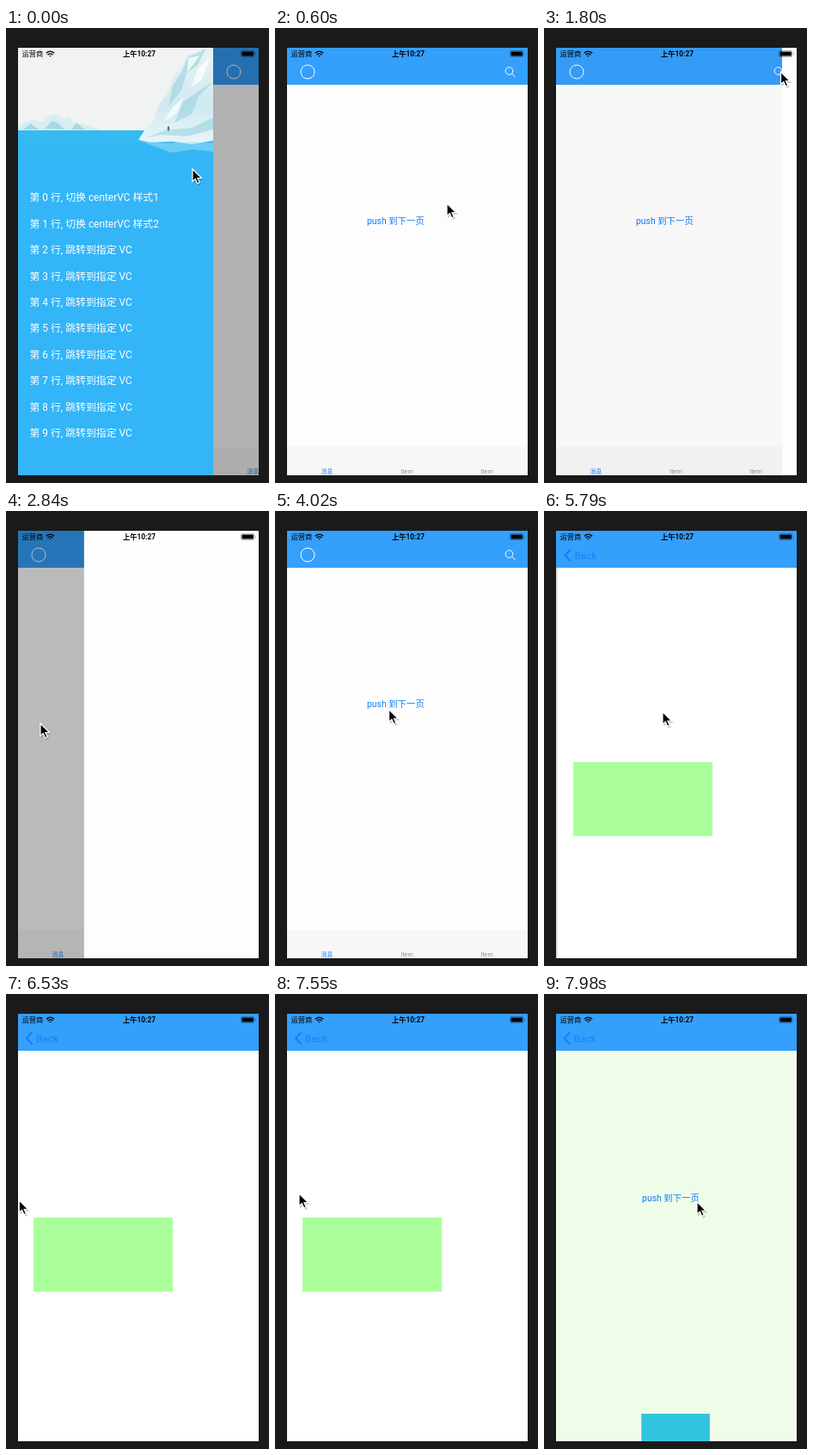
These frames come from a looping animation (306 by 529 pixels, 8000 ms). An HTML page:

```html
<!DOCTYPE html>
<html lang="zh-CN">
<head>
<meta charset="utf-8">
<title>Drawer navigation</title>
<style>
html, body { margin: 0; width: 100%; height: 100%; overflow: hidden; background: #1a1a1a; }
svg { display: block; width: 100vw; height: 100vh; }
text { font-family: Roboto, "Noto Sans CJK SC", "Noto Sans CJK", sans-serif; }
.link { font-size: 10.4px; fill: #0f7cff; }
.row { font-size: 11.9px; fill: #fff; }
.tab { font-size: 7.2px; fill: #929292; text-anchor: middle; }
.status { font-size: 8.3px; font-weight: 500; }
</style>
</head>
<body>
<svg viewBox="0 0 306 529">
  <defs>
    <clipPath id="screen"><rect x="14" y="23" width="280" height="497"/></clipPath>
    <clipPath id="panel"><rect x="14" y="23" width="227" height="497"/></clipPath>
    <linearGradient id="sea" x2="0" y2="1">
      <stop offset="0" stop-color="#36bbef"/>
      <stop offset="1" stop-color="#33b5f8"/>
    </linearGradient>
    <linearGradient id="ice" x2="0" y2="1">
      <stop offset="0" stop-color="#eaf3f5"/>
      <stop offset=".6" stop-color="#cfeaf0"/>
      <stop offset="1" stop-color="#e8f6fa"/>
    </linearGradient>
    <g id="back" fill="none" stroke="#1480ff">
      <path d="M30.500 44.500L24 51.500l6.500 7" stroke-width="2"/>
      <text x="35" y="55.500" font-size="11.8" fill="#1480ff" stroke="none">Back</text>
    </g>
  </defs>
  <rect width="306" height="529" fill="#1a1a1a"/>
  <g clip-path="url(#screen)">
    <rect x="14" y="23" width="280" height="497" fill="#fff"/>
    <g id="left" clip-path="url(#panel)">
      <rect x="14" y="23" width="227" height="497" fill="#33b5f8"/>
      <rect x="14" y="23" width="227" height="97" fill="#f1f2f2"/>
      <rect x="14" y="119" width="227" height="38" fill="url(#sea)"/>
      <path d="M14 119v-5l10-5 9-2 8 3 9-8 8-2 7 5 8-1 7 6 10 2 9 3 14 4z" fill="#d8edf1"/>
      <path d="M45 117l9-9 7 3 7 7zM20 118l9-7 9 7zM76 118l6-8 9 8z" fill="#a5d8e4"/>
      <path d="M241 23h-8l-10 7-13 1-7 14-9 13-5 17-11 14-6 18-9 9-9 14 14 3 26-1 22 3 25-4z" fill="url(#ice)"/>
      <path d="M233 24l-10 19-13 10-6 20-15 18 5-24 9-14 9-20zM241 62l-17 18-8 20-20 10 10-24 17-12zM241 104l-25 12-31 3-23 9 18-4 30 2 31-8z" fill="#98d0df" opacity=".55"/>
      <path d="M212 35l13-3-14 20zM238 33l-10 27-13 9 8-21zM194 92l13-12-8 19-15 9z" fill="#fff" opacity=".75"/>
      <path d="M155 131l30 3 30-2 26 2v10l-24-3-24 4z" fill="#a6e1f7" opacity=".5"/>
      <ellipse cx="189" cy="117" rx="1.300" ry="3" fill="#55747c"/>
      <g id="rows"></g>
    </g>
    <g id="centre">
      <g id="page1">
        <rect x="14" y="23" width="280" height="497" fill="#fdfdfd"/>
        <text class="link" x="107" y="228">push 到下一页</text>
        <rect x="14" y="487" width="280" height="33" fill="#f7f7f7"/>
        <text class="tab" x="60.500" y="518" style="fill:#1283ff;font-size:6.900px">消息</text>
        <text class="tab" x="153.500" y="518">Item</text>
        <text class="tab" x="246.500" y="518">Item</text>
      </g>
      <rect id="shade1" x="14" y="23" width="280" height="497"/>
      <g id="page2">
        <rect x="14" y="23" width="280" height="497" fill="#effde8"/>
        <text class="link" x="115" y="241">push 到下一页</text>
        <rect x="114.200" y="488" width="79.600" height="32" fill="#31c4de"/>
      </g>
      <rect id="shade2" x="14" y="23" width="280" height="497"/>
      <g id="page3">
        <rect x="14" y="23" width="280" height="497" fill="#fff"/>
        <rect id="box" x="32" width="162" height="86" fill="#aaff9b"/>
      </g>
      <rect x="14" y="23" width="280" height="43" fill="#359ffc"/>
      <g id="home" fill="none" stroke="#fff" stroke-width="1">
        <circle cx="38" cy="51" r="8"/>
        <circle cx="272.500" cy="50" r="4.300"/>
        <path d="M275.500 53l4 4"/>
      </g>
      <use id="backA" href="#back"/>
      <use id="backB" href="#back"/>
      <rect id="dim" x="14" y="23" width="280" height="497"/>
    </g>
    <rect id="right" y="23" width="227" height="497" fill="#fdfdfd"/>
    <g>
      <text class="status" x="18.500" y="33">运营商</text>
      <g fill="none" stroke="#000" stroke-width="1.300">
        <path d="M46.800 29.300q4.700-4.300 9.400 0M48.500 31.200q3-2.600 6 0"/>
        <path d="M50.200 32l1.300 1.500 1.300-1.500z" fill="#000" stroke="none"/>
      </g>
      <text class="status" x="155" y="33" text-anchor="middle" style="font-weight:700">上午10:27</text>
      <rect x="273.500" y="26.500" width="15.500" height="7" rx="1.500" fill="none" stroke="#000" stroke-opacity=".5" stroke-width=".6"/>
      <rect x="274.500" y="27.500" width="13.500" height="5" rx=".8"/>
      <path d="M290 28.700q1.300 1.300 0 2.600z" opacity=".6"/>
    </g>
  </g>
  <g id="cursor">
    <path d="M1 1.500V17l3.500-3 2.500 5 3-1.200-2.200-5H13z" opacity=".2"/>
    <path d="M0 0v14.500l3.300-3 2.400 5.300 2.500-1.100-2.300-5.200h4.600z" stroke="#fff" stroke-width="1.200"/>
  </g>
</svg>
<script>
const LOOP = 8000, STEP = 147.78, PANEL = 227, WIDTH = 280;
const el = {};
document.querySelectorAll('[id]').forEach(n => el[n.id] = n);

el.rows.innerHTML = Array.from({ length: 10 }, (_, i) => {
  const label = i < 2 ? `切换 centerVC 样式${i + 1}` : '跳转到指定 VC';
  return `<text class="row" x="27.500" y="${201.3 + i * 30.4}">第 ${i} 行, ${label}</text>`;
}).join('');

const clamp = v => Math.min(1, Math.max(0, v));
const smooth = v => v * v * (3 - 2 * v);
const ease = (t, start, length) => smooth(clamp((t - start) / length));

// Critically damped spring, as in a navigation push
function spring(t, start) {
  const x = Math.max(0, t - start) * 0.017;
  return x > 12 ? 1 : 1 - Math.exp(-x) * (1 + x);
}

function track(t, keys, curve) {
  const i = keys.findIndex(k => k[0] > t);
  if (i < 0) return keys[keys.length - 1].slice(1);
  if (i === 0) return keys[0].slice(1);
  const a = keys[i - 1], b = keys[i];
  const p = curve((t - a[0]) / (b[0] - a[0]));
  return a.slice(1).map((v, j) => v + (b[j + 1] - v) * p);
}

const pointer = [
  [0, 217, 164], [120, 217, 164], [420, 203, 196], [590, 200, 204], [860, 200, 204],
  [1620, 275.500, 51], [1900, 275.500, 51], [2640, 40, 247], [3040, 40, 247],
  [4130, 137, 230], [4877, 136, 228.500], [5300, 138, 233.500], [5800, 138, 233.500],
  [6600, 10, 240], [6720, 10, 240], [7040, 108, 238], [7390, 28, 232],
  [7540, 28, 232], [7840, 155, 240], [7980, 178, 241.500]
];
// Edge swipe: one cancelled, one completed
const swipe = [
  [6700, 0], [7040, 98], [7380, 0], [7540, 0],
  [7685, 65], [7832, 215], [7980, 277]
];

const move = (n, x, y = 0) => n.setAttribute('transform', `translate(${x} ${y})`);
const fade = (n, v) => n.setAttribute('opacity', v);

function draw(t) {
  const left = 1 - ease(t, 340, 240);
  const right = ease(t, 1739, 205) - ease(t, 2771, 183);
  const push = spring(t, 4377);
  const drag = track(t, swipe, v => v)[0];
  const top = spring(t, 5353) - drag / WIDTH;

  move(el.left, (left - 1) * PANEL);
  move(el.centre, left * PANEL);
  el.right.setAttribute('x', 294 - right * PANEL);
  fade(el.dim, 0.3 * Math.max(left, right));

  move(el.page1, -0.3 * WIDTH * push);
  fade(el.shade1, 0.1 * push);
  move(el.page2, WIDTH * (1 - push) - 0.3 * WIDTH * top);
  fade(el.shade2, push > 0.99 ? 0.1 * top : 0);
  move(el.page3, WIDTH * (1 - top));
  el.box.setAttribute('y', t < 5850 ? 292 : 260);

  // The bar stays put during the cancelled swipe
  const bar = t > 6400 && t < 7540 ? 1 : top;
  fade(el.home, 1 - push);
  move(el.backA, 60 * (1 - push) - 30 * bar);
  fade(el.backA, push * (1 - bar));
  move(el.backB, 60 * (1 - bar));
  fade(el.backB, bar);

  move(el.cursor, ...track(t, pointer, smooth));
}

// The screen advances in even steps
function tick() {
  const t = performance.now() % LOOP;
  draw(Math.floor(t / STEP) * STEP);
  requestAnimationFrame(tick);
}
tick();
</script>
</body>
</html>
```
